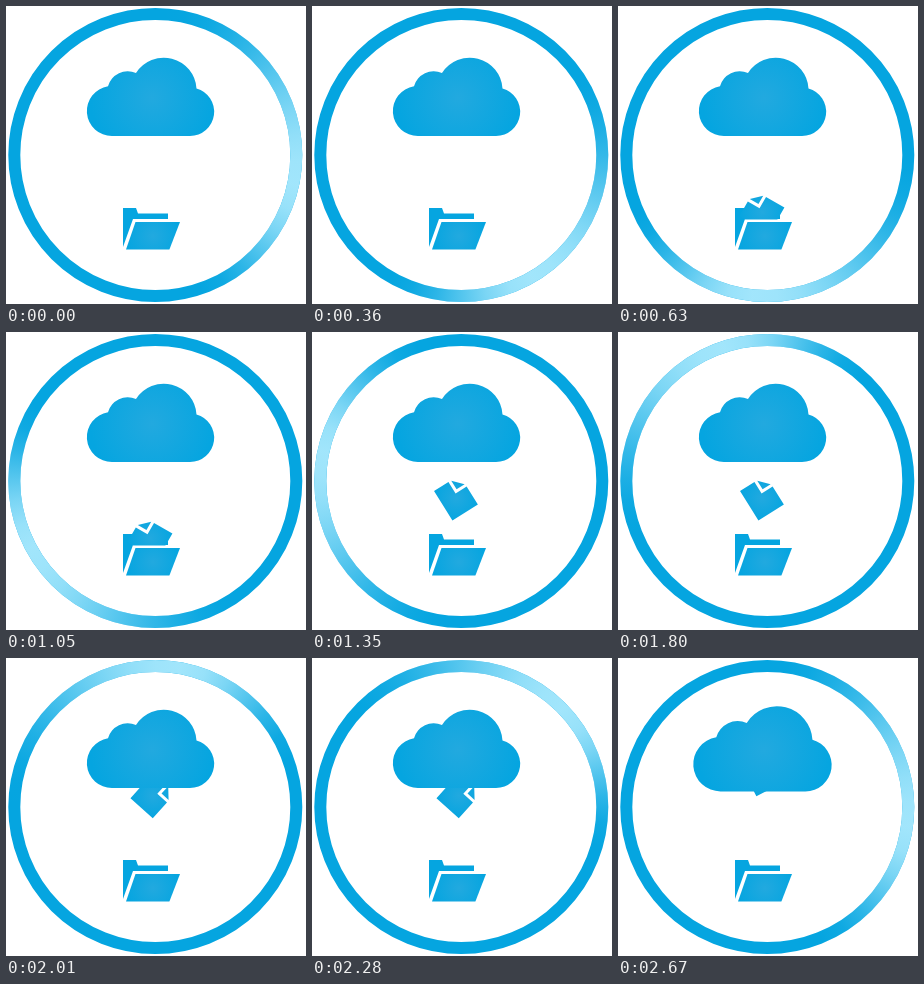
An HTML page with a canvas for the animation above (2.7 s loop, 300 px wide and 298 px high).

```html
<!DOCTYPE html>
<html>
<head>
<meta charset="utf-8">
<style>
  html, body { margin: 0; height: 100%; overflow: hidden; background: #fff; }
  canvas { display: block; }
</style>
</head>
<body>
<canvas id="stage" width="300" height="298"></canvas>
<script>
const ctx = document.getElementById('stage').getContext('2d');
const LOOP = 2700, FRAME = 30, STEP = 630, FIRST_STEP = 570;
const DEG = Math.PI / 180;
const BLUE = '#05a5e0';

const cloud = new Path2D('M106 130A25 25 0 0 1 102 80.3A20.5 20.5 0 0 1 130 67' +
  'A32.8 32.8 0 0 1 190.5 82.5A24.2 24.2 0 0 1 184 130Z');
const folderBack = new Path2D('M117 202H130L132 207.5H162V213H127L117 241Z');
const folderFront = new Path2D('M129.5 216H174L163.4 243.5H120Z');
const page = new Path2D('M-15 17V-17.75H2V-4.25H15V17Z M5 -17.2L14.5 -7.2H5Z');
const pageAngles = [-60, -32, 42, 63];

function glow(x, y, radius) {
  const g = ctx.createRadialGradient(x, y, 0, x, y, radius);
  g.addColorStop(0, '#22a9df');
  g.addColorStop(1, BLUE);
  return g;
}

// Light on the ring: short fade ahead of the peak, long fade behind it.
function shineAt(deg) {
  const distance = deg < 180 ? deg / 60 : (360 - deg) / 95;
  return Math.cos(Math.min(1, distance) * Math.PI / 2) ** 2;
}

function drawRing(t) {
  const shine = ctx.createConicGradient((12 + 360 * t / LOOP) * DEG, 149.3, 149);
  for (let deg = 0; deg <= 360; deg += 10) {
    shine.addColorStop(deg / 360, `rgba(170,233,253,${0.95 * shineAt(deg)})`);
  }
  ctx.lineWidth = 12;
  for (const style of [BLUE, shine]) {
    ctx.strokeStyle = style;
    ctx.beginPath();
    ctx.arc(149.3, 149, 141, 0, 2 * Math.PI);
    ctx.stroke();
  }
}

// The page climbs in ever smaller steps, swaying sideways as it turns.
function drawPage(step) {
  const angle = pageAngles[step] * DEG;
  ctx.save();
  ctx.translate(145.5 + 1.5 * Math.sin(2 * angle), 66 + 140 * 0.715 ** step);
  ctx.rotate(angle);
  ctx.fillStyle = glow(0, 0, 24);
  ctx.fill(page);
  ctx.restore();
}

function drawFolderFront() {
  ctx.strokeStyle = '#fff';
  ctx.lineWidth = 5;
  ctx.stroke(folderFront);
  ctx.fillStyle = glow(147, 230, 28);
  ctx.fill(folderFront);
}

function drawCloud(scale) {
  ctx.save();
  ctx.translate(145, 91);
  ctx.scale(scale, scale);
  ctx.translate(-145, -91);
  ctx.fillStyle = glow(146, 92, 62);
  ctx.fill(cloud);
  ctx.restore();
}

function draw(now) {
  const t = Math.floor(now % LOOP / FRAME) * FRAME;
  const step = Math.floor((t - FIRST_STEP) / STEP);
  ctx.fillStyle = '#fff';
  ctx.fillRect(0, 0, 300, 298);
  drawRing(t);
  ctx.fillStyle = BLUE;
  ctx.fill(folderBack);
  if (step >= 0) drawPage(step);
  drawFolderFront();
  drawCloud(step === 3 ? 1.087 : 1);
}

const start = performance.now();
function tick() {
  draw(performance.now() - start);
  requestAnimationFrame(tick);
}
tick();
</script>
</body>
</html>
```
